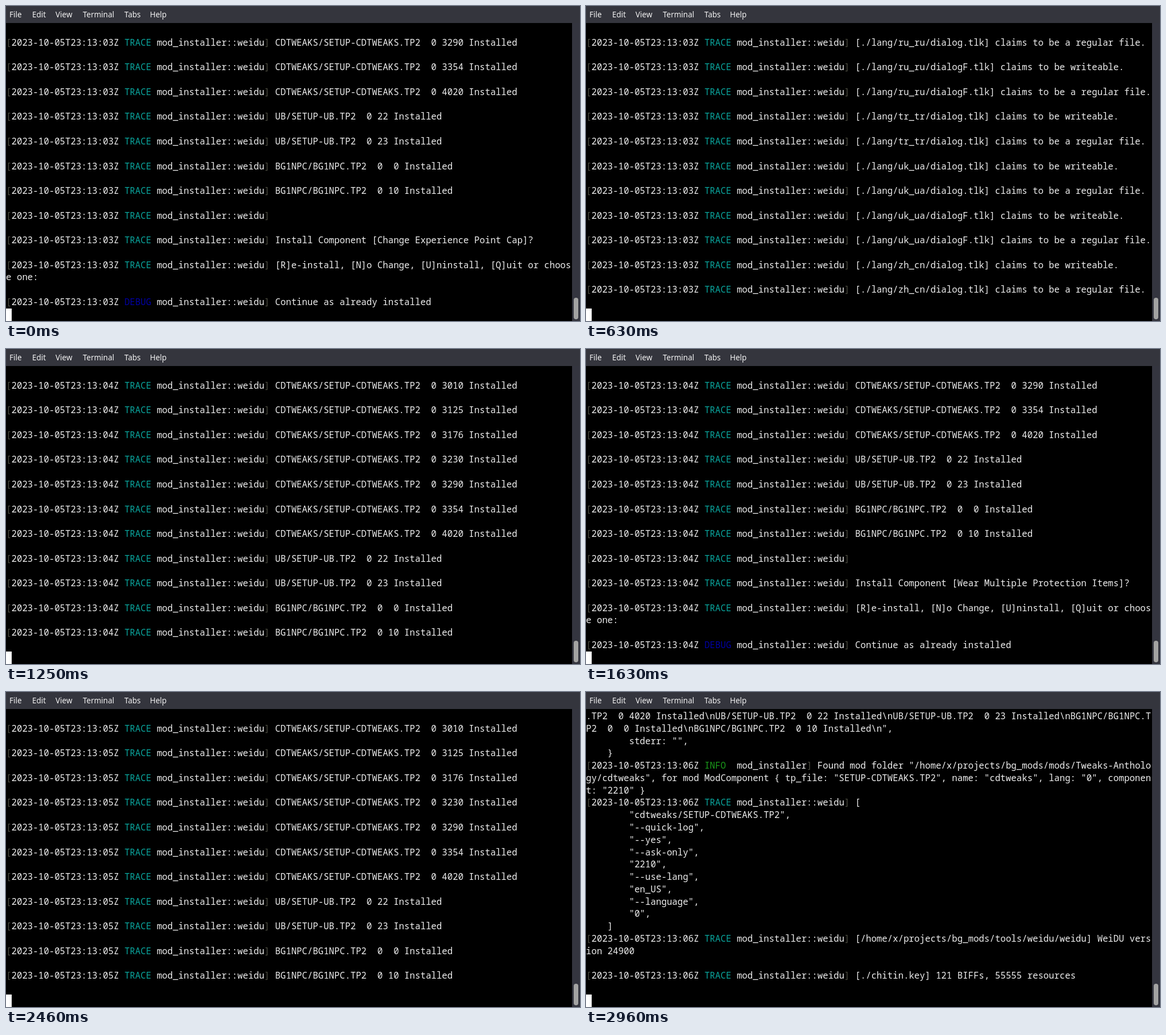
Write an HTML page that moves like this. It is 1009 by 555 pixels and loops after 3 s.

```html
<!DOCTYPE html>
<html lang="en">
<head>
<meta charset="utf-8">
<title>Terminal</title>
<style>
  html, body { margin: 0; width: 100%; height: 100%; overflow: hidden; background: #000; }
  #stage { position: relative; width: 1009px; height: 555px; overflow: hidden; background: #000; }
  #menu { position: absolute; left: 0; top: 0; width: 1009px; height: 30px; background: #34353d; }
  #menu span { position: absolute; top: 0; font: 13.5px/30px "Noto Sans", sans-serif; color: #f2f2f2; }
  #bar { position: absolute; left: 995px; top: 30px; width: 14px; height: 525px; background: #34353f; }
  #thumb { position: absolute; left: 3px; top: 484px; width: 8px; height: 38px; border-radius: 4px; background: #a3a3a2; }
  #log { position: absolute; left: 0; top: 32.1px; margin: 0; color: #eee;
         font: 15.77px/21.77px "Noto Sans Mono", monospace; font-variant-ligatures: none; }
  #log i { font-style: normal; color: #4c4c40; }
  #log b { font-weight: normal; }
  .TRACE { color: #0aa59d; }
  .DEBUG { color: #0000a4; }
  .INFO { color: #1a9a1a; }
  #cursor { position: absolute; left: 0; top: 533px; width: 9.5px; height: 22px; background: #fff; }
</style>
</head>
<body>
<div id="stage">
  <div id="menu">
    <span style="left:6px">File</span><span style="left:46px">Edit</span>
    <span style="left:87px">View</span><span style="left:135px">Terminal</span>
    <span style="left:208px">Tabs</span><span style="left:253px">Help</span>
  </div>
  <pre id="log"></pre>
  <div id="cursor"></div>
  <div id="bar"><div id="thumb"></div></div>
</div>
<script>
const COLS = 105, ROWS = 23, LOOP = 3000, FPS = 24;
const entries = [], marks = {};   // entries: arrays of screen rows
let sec = 3;

const wrap = s => s.split('\n').flatMap(l => l.match(new RegExp(`.{1,${COLS}}`, 'g')) || ['']);
const add = s => entries.push(wrap(s));
const say = (level, mod, s) => add(`[2023-10-05T23:13:0${sec}Z ${level.padEnd(5)} ${mod}] ${s}`);
const trace = s => say('TRACE', 'mod_installer::weidu', s);
const weidu = s => trace(s + '\n');
const mark = name => marks[name] = entries.length;

const langs = ['cs_cz', 'de_de', 'en_us', 'es_es', 'fr_fr', 'hu_hu', 'it_it', 'ja_jp',
  'ko_kr', 'pl_pl', 'pt_br', 'ru_ru', 'tr_tr', 'uk_ua', 'zh_cn'];
const female = /cs|de_|es_|fr|it_|pl|ru|uk/;
const claims = langs.flatMap(l => (female.test(l) ? ['dialog', 'dialogF'] : ['dialog']).flatMap(f =>
  ['writeable', 'a regular file'].map(c => `[./lang/${l}/${f}.tlk] claims to be ${c}.`)));

const installed = [
  ['CDTWEAKS/SETUP-CDTWEAKS', [10, 20, 60, 1010, 1060, 1080, 2090, 2150, 2200, 2210, 3010, 3125, 3176, 3230, 3290, 3354, 4020]],
  ['UB/SETUP-UB', [22, 23]],
  ['BG1NPC/BG1NPC', [0, 10]]
].flatMap(([file, ids]) => ids.map(n => `${file}.TP2  0 ${String(n).padStart(2)} Installed`));

function header(id) {
  say('INFO', 'mod_installer', 'Found mod folder "/home/x/projects/bg_mods/mods/Tweaks-Anthology/cdtweaks", ' +
    `for mod ModComponent { tp_file: "SETUP-CDTWEAKS.TP2", name: "cdtweaks", lang: "0", component: "${id}" }`);
  const args = ['cdtweaks/SETUP-CDTWEAKS.TP2', '--quick-log', '--yes', '--ask-only', id,
    '--use-lang', 'en_US', '--language', '0'];
  trace(`[\n${args.map(a => `        "${a}",\n`).join('')}    ]`);
  weidu('[/home/x/projects/bg_mods/tools/weidu/weidu] WeiDU version 24900');
  weidu('[./chitin.key] 121 BIFFs, 55555 resources');
}

function dump() {
  const head = '        stdout: "', tail = '\\n",';
  const body = [...claims, ...installed].join('\\n');
  const size = COLS * 14 + 57 - head.length - tail.length;
  say('DEBUG', 'mod_installer::weidu', 'Output {');
  wrap(head + body.slice(-size) + tail).forEach(add);
  add('        stderr: "",');
  add('    }');
}

function run(n, id, name, listSec) {
  header(id);
  mark('key' + n);
  claims.forEach(weidu);
  mark('zh' + n);
  weidu('Using Language [English]');
  weidu('[English] has 2 top-level TRA files');
  weidu('[cdtweaks/languages/english/game.tra] has 517 translation strings');
  weidu('[cdtweaks/languages/english/weidu.tra] has 388 translation strings');
  weidu('');
  weidu('Using ./lang/en_us/dialog.tlk');
  mark('use' + n);
  sec = listSec;
  installed.forEach(weidu);
  mark('list' + n);
  weidu('');
  weidu(`Install Component [${name}]?`);
  weidu('[R]e-install, [N]o Change, [U]ninstall, [Q]uit or choose one:');
  say('DEBUG', 'mod_installer::weidu', 'Continue as already installed');
  mark('end' + n);
  dump();
}

run(0, '2090', 'Change Experience Point Cap', 3);
run(1, '2150', 'Wear Multiple Protection Items', 4);
sec = 5;
run(2, '2200', 'Multi-Class Grandmastery', 5);
sec = 6;
header('2210');
mark('key3');

// Output arrives in bursts with pauses: [ms, log position]
const keys = [
  [0, 'end0'], [290, 'end0'], [415, 'key1'], [460, 'key1'], [585, 'zh1'], [665, 'zh1'],
  [705, 'use1'], [1080, 'use1'], [1205, 'list1'], [1540, 'list1'], [1580, 'end1'],
  [1710, 'end1'], [1830, 'key2'], [1875, 'key2'], [2030, 'use2'], [2290, 'use2'],
  [2410, 'list2'], [2670, 'list2'], [2710, 'end2'], [2800, 'end2'], [2910, 'key3'], [LOOP, 'key3']
];

function position(t) {
  const i = keys.findIndex(k => k[0] > t);
  const [t0, a] = keys[i - 1], [t1, b] = keys[i];
  return Math.floor(marks[a] + (marks[b] - marks[a]) * (t - t0) / (t1 - t0));
}

const paint = row => row.replace(/^\[(\S+Z) (\w+)( +)([\w:]+)\]/,
  '<i>[</i>$1 <b class="$2">$2</b>$3$4<i>]</i>');

const log = document.getElementById('log');
let shown = -1;
function draw() {
  const t = performance.now() % LOOP;
  const pos = position(Math.floor(t * FPS / 1000) * 1000 / FPS);
  if (pos !== shown) {
    shown = pos;
    const rows = entries.slice(Math.max(0, pos - ROWS), pos).flat().slice(-ROWS);
    log.innerHTML = rows.map(paint).join('\n');
  }
  requestAnimationFrame(draw);
}
draw();
</script>
</body>
</html>
```
